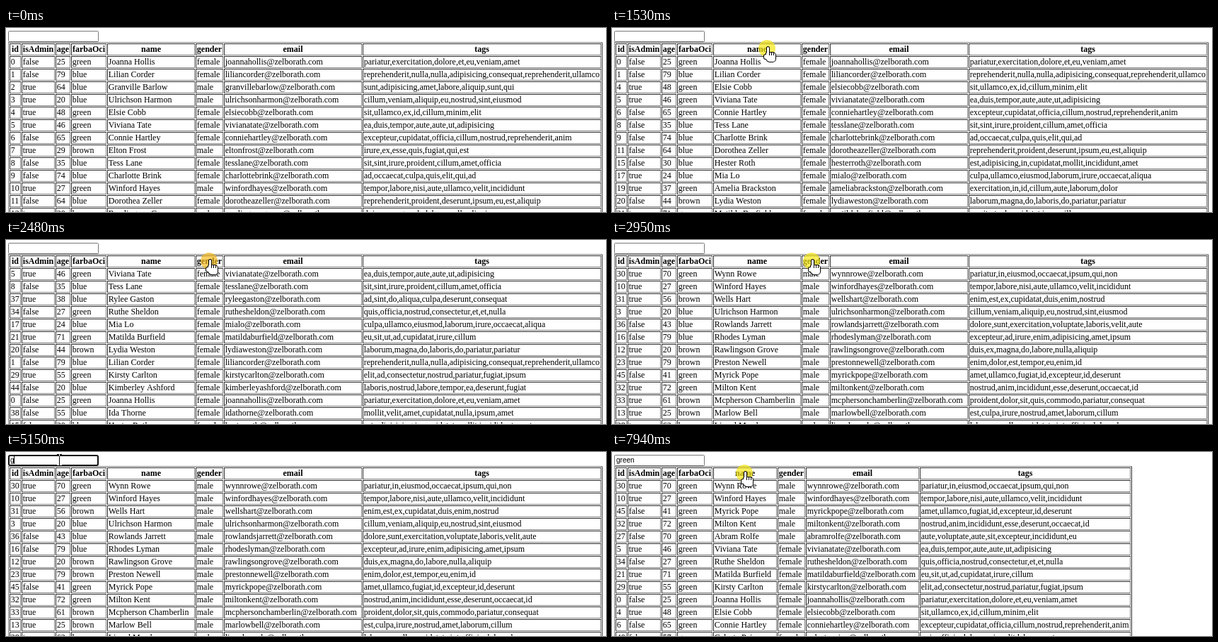
Write an HTML page with a canvas that moves like this. It is 848 by 262 pixels and loops after 8000 ms.

```html
<!DOCTYPE html>
<html lang="en">
<head>
<meta charset="utf-8">
<title>Sortable table</title>
<style>
  html, body { margin: 0; width: 100%; height: 100%; overflow: hidden; background: #fff; }
  canvas { display: block; }
</style>
</head>
<body>
<canvas id="stage" width="848" height="262"></canvas>
<script>
const ctx = document.getElementById('stage').getContext('2d');
const LOOP = 8000;
const SERIF = '"Liberation Serif", "Times New Roman", serif';
const SANS = '"Liberation Sans", Arial, sans-serif';
const GRAY = '#808080', DARK = '#2c2c2c';
const LEFT = 3, TOP = 20, PITCH = 18;

const people = `
0 false 25 green female|Joanna Hollis|pariatur,exercitation,dolore,et,eu,veniam,amet
1 false 79 blue female|Lilian Corder|reprehenderit,nulla,nulla,adipisicing,consequat,reprehenderit,ullamco
2 true 64 blue male|Granville Barlow|sunt,adipisicing,amet,labore,aliquip,sunt,qui
3 true 20 blue male|Ulrichson Harmon|cillum,veniam,aliquip,eu,nostrud,sint,eiusmod
4 true 48 green female|Elsie Cobb|sit,ullamco,ex,id,cillum,minim,elit
5 true 46 green female|Viviana Tate|ea,duis,tempor,aute,aute,ut,adipisicing
6 false 65 green female|Connie Hartley|excepteur,cupidatat,officia,cillum,nostrud,reprehenderit,anim
7 true 29 brown male|Elton Frost|irure,ex,esse,quis,fugiat,qui,est
8 false 35 blue female|Tess Lane|sit,sint,irure,proident,cillum,amet,officia
9 false 74 blue female|Charlotte Brink|ad,occaecat,culpa,quis,elit,qui,ad
10 true 27 green male|Winford Hayes|tempor,labore,nisi,aute,ullamco,velit,incididunt
11 false 64 blue female|Dorothea Zeller|reprehenderit,proident,deserunt,ipsum,eu,est,aliquip
12 true 20 brown male|Rawlingson Grove|duis,ex,magna,do,labore,nulla,aliquip
13 true 25 brown male|Marlow Bell|est,culpa,irure,nostrud,amet,laborum,cillum
15 false 30 blue female|Hester Roth|est,adipisicing,in,cupidatat,mollit,incididunt,amet
16 false 79 blue male|Rhodes Lyman|excepteur,ad,irure,enim,adipisicing,amet,ipsum
17 true 24 blue female|Mia Lo|culpa,ullamco,eiusmod,laborum,irure,occaecat,aliqua
19 true 37 green female|Amelia Brackston|exercitation,in,id,cillum,aute,laborum,dolor
20 false 44 brown female|Lydia Weston|laborum,magna,do,laboris,do,pariatur,pariatur
21 true 71 green female|Matilda Burfield|eu,sit,ut,ad,cupidatat,irure,cillum
23 true 79 brown male|Preston Newell|enim,dolor,est,tempor,eu,enim,id
27 false 70 green male|Abram Rolfe|aute,voluptate,aute,sit,excepteur,incididunt,eu
28 true 62 brown male|Lionel Meade|laborum,nulla,cupidatat,sint,officia,dolor,ad
29 true 55 green female|Kirsty Carlton|elit,ad,consectetur,nostrud,pariatur,fugiat,ipsum
30 true 70 green male|Wynn Rowe|pariatur,in,eiusmod,occaecat,ipsum,qui,non
31 true 56 brown male|Wells Hart|enim,est,ex,cupidatat,duis,enim,nostrud
32 true 72 green male|Milton Kent|nostrud,anim,incididunt,esse,deserunt,occaecat,id
33 true 61 brown male|Mcpherson Chamberlin|proident,dolor,sit,quis,commodo,pariatur,consequat
34 false 27 green female|Ruthe Sheldon|quis,officia,nostrud,consectetur,et,et,nulla
36 false 43 blue male|Rowlands Jarrett|dolore,sunt,exercitation,voluptate,laboris,velit,aute
37 true 38 blue female|Rylee Gaston|ad,sint,do,aliqua,culpa,deserunt,consequat
38 false 55 blue female|Ida Thorne|mollit,velit,amet,cupidatat,nulla,ipsum,amet
40 false 57 green female|Celeste Paine|quis,officia,dolore,anim,elit,labore,sunt
44 false 20 blue female|Kimberley Ashford|laboris,nostrud,labore,tempor,ea,deserunt,fugiat
45 false 41 green male|Myrick Pope|amet,ullamco,fugiat,id,excepteur,id,deserunt`
  .trim().split('\n').map(line => {
    const [facts, name, tags] = line.split('|');
    const [id, isAdmin, age, farbaOci, gender] = facts.split(' ');
    const email = name.toLowerCase().replace(' ', '') + '@zelborath.com';
    return { id, isAdmin, age, farbaOci, name, gender, email, tags };
  });

// Cell widths; the filtered table only shrinks where its longest text does
const FULL = { id: 16, isAdmin: 47, age: 21, farbaOci: 50, name: 124, gender: 39, email: 195, tags: 337 };
const FILTERED = { ...FULL, name: 90, email: 160, tags: 298 };

const sortBy = (rows, key, dir) =>
  [...rows].sort((a, b) => dir * ((a[key] > b[key]) - (a[key] < b[key])));

// Each header click flips the sort direction
const clicks = [[1050, 'gender'], [1660, 'name'], [2280, 'gender'], [2610, 'gender']];
const WORD = 'green';
const keyTimes = [5150, 5350, 5550, 5750, 6350];
const FOCUS = 3770, BLUR = 7940, BLINK = 525;

// start, end, x, y
const moves = [
  [70, 700, 219, 44], [700, 990, 285, 36], [1080, 1400, 219, 29],
  [1600, 1870, 287, 39], [2070, 2280, 287, 30], [2880, 3640, 72, 12],
  [4030, 4360, 75, 11], [7100, 7450, 207, 96], [7450, 7870, 187, 30]
];

const ease = k => k * k * (3 - 2 * k);
const clamp = k => Math.max(0, Math.min(1, k));

function rect(x, y, w, h, color) {
  ctx.fillStyle = color;
  ctx.fillRect(x, y, w, h);
}

function frame(x, y, w, h, topLeft, bottomRight) {
  rect(x, y + h - 1, w, 1, bottomRight);
  rect(x + w - 1, y, 1, h, bottomRight);
  rect(x, y, w, 1, topLeft);
  rect(x, y, 1, h, topLeft);
}

function rowsAt(t, typed) {
  let rows = people, dir = 1;
  for (const [time, key] of clicks) {
    if (t < time) break;
    rows = sortBy(rows, key, dir);
    dir = -dir;
  }
  return typed > 1 ? rows.filter(p => p.farbaOci === WORD) : rows;
}

function drawTable(rows, widths) {
  let x = LEFT + 2;
  for (const [key, w] of Object.entries(widths)) {
    for (let r = 0; r < 14; r++) {
      const top = TOP + 2 + PITCH * r;
      frame(x, top, w, PITCH - 1, DARK, GRAY);
      ctx.font = `${r ? '' : 'bold '}12px ${SERIF}`;
      ctx.textAlign = r ? 'left' : 'center';
      ctx.fillStyle = '#000';
      ctx.fillText(r ? rows[r - 1][key] : key, r ? x + 1.75 : x + w / 2, top + 12);
    }
    x += w + 1;
  }
  frame(LEFT, TOP, x + 1 - LEFT, 400, GRAY, DARK);
}

function drawInput(t, typed) {
  const focused = t >= FOCUS && t < BLUR;
  ctx.strokeStyle = focused ? '#101010' : '#767676';
  ctx.lineWidth = focused ? 2 : 1;
  ctx.beginPath();
  if (focused) ctx.roundRect(4, 5, 126, 14, 2);
  else ctx.roundRect(3.5, 4.5, 127, 15, 1);
  ctx.stroke();

  const value = WORD.slice(0, typed);
  ctx.font = `10px ${SANS}`;
  ctx.textAlign = 'left';
  ctx.fillStyle = '#000';
  ctx.fillText(value, 6, 15);
  const since = typed ? keyTimes[typed - 1] : FOCUS;
  if (focused && Math.floor((t - since) / BLINK) % 2 === 0) {
    rect(Math.floor(6 + ctx.measureText(value).width), 6, 1, 11, '#000');
  }
}

function pointerAt(t) {
  let px = 672, py = 235;
  for (const [start, end, x, y] of moves) {
    const k = ease(clamp((t - start) / (end - start)));
    px += (x - px) * k;
    py += (y - py) * k;
  }
  return [Math.round(px), Math.round(py)];
}

// Inverts what lies below, so it also shows on the dark border
function drawBeam(x, y) {
  ctx.globalCompositeOperation = 'difference';
  rect(x, y - 7, 1, 14, '#fff');
  for (const end of [y - 8, y + 7]) {
    rect(x - 3, end, 3, 1, '#fff');
    rect(x + 1, end, 3, 1, '#fff');
  }
  ctx.globalCompositeOperation = 'source-over';
}

function outlined(shape) {
  ctx.strokeStyle = '#000';
  ctx.lineWidth = 2;
  ctx.stroke(shape);
  ctx.fillStyle = '#fff';
  ctx.fill(shape);
}

function drawHand(x, y) {
  const hand = new Path2D();
  hand.roundRect(x - 1, y - 2, 3, 14, 1.5);
  hand.roundRect(x - 5, y + 9, 5, 6, 2);
  hand.roundRect(x - 2, y + 6, 13, 13, [1, 4, 4, 5]);
  outlined(hand);
  for (const gap of [2, 5, 8]) rect(x + gap, y + 6, 1, 4, '#000');
}

function drawArrow(x, y) {
  const arrow = new Path2D();
  arrow.moveTo(x, y);
  arrow.lineTo(x, y + 15);
  arrow.lineTo(x + 10, y + 11);
  arrow.closePath();
  outlined(arrow);
}

function drawPointer(t) {
  if (t < moves[0][0]) return;
  const [x, y] = pointerAt(t);
  if (y < TOP && x < 131) {
    drawBeam(x, y);
    return;
  }
  const pressed = t >= 2480 && t < 2610;
  ctx.fillStyle = pressed ? 'rgba(242, 185, 30, 0.7)' : 'rgba(245, 230, 20, 0.7)';
  ctx.beginPath();
  ctx.arc(x, y, 12, 0, 2 * Math.PI);
  ctx.fill();
  if (y >= TOP && y < TOP + 2 + PITCH) drawHand(x + 1, y);
  else drawArrow(x, y);
}

function draw(now) {
  const t = now % LOOP;
  const typed = keyTimes.filter(time => time <= t).length;
  rect(0, 0, 848, 262, '#fff');
  drawInput(t, typed);
  drawTable(rowsAt(t, typed), typed > 1 ? FILTERED : FULL);
  drawPointer(t);
}

const start = performance.now();
function tick() {
  draw(performance.now() - start);
  requestAnimationFrame(tick);
}
tick();
</script>
</body>
</html>
```
